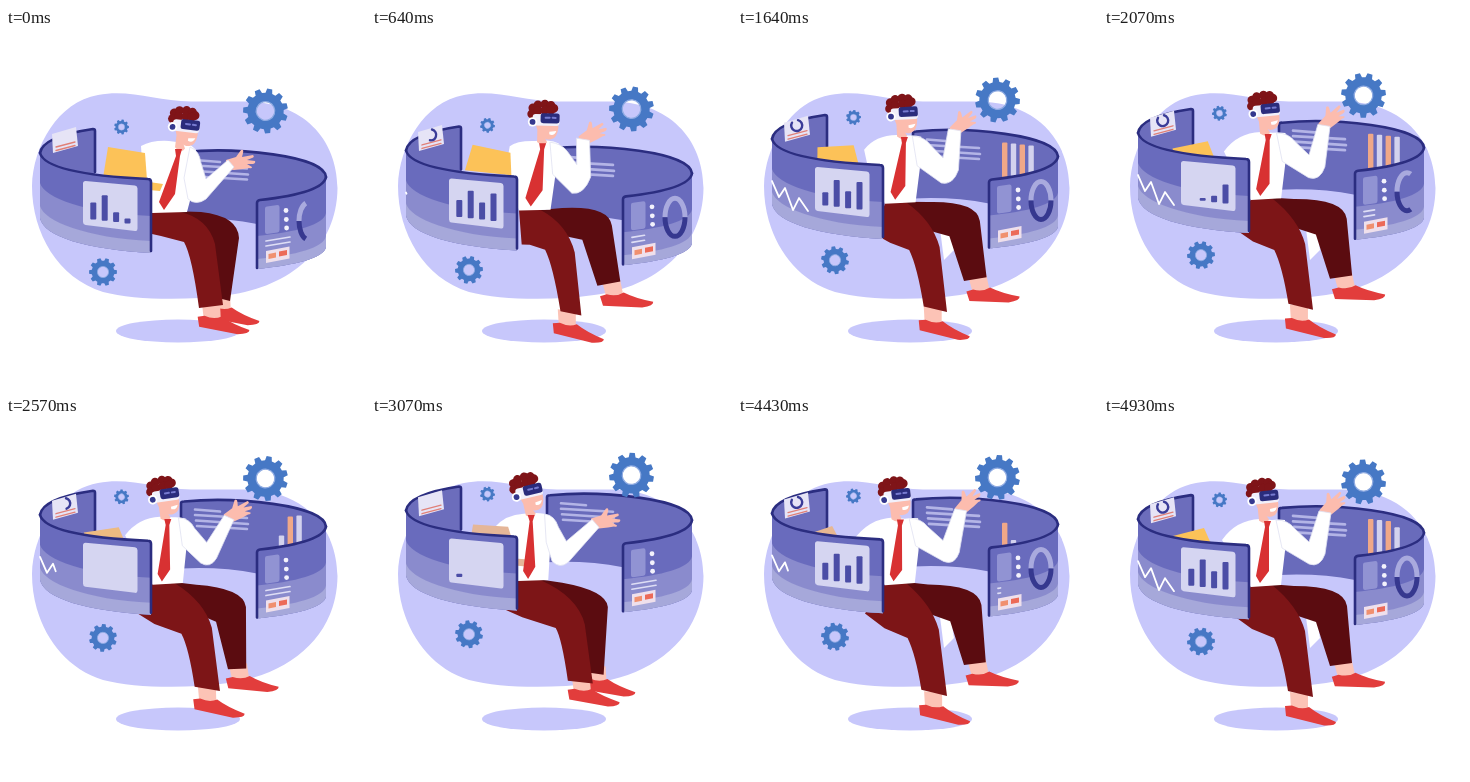
An HTML page for the animation above (5 s loop, 360x360 px).

```html
<!DOCTYPE html>
<html>
<head>
<meta charset="utf-8">
<style>
html, body { margin: 0; width: 100%; height: 100%; overflow: hidden; background: #fff; }
svg { display: block; width: 100vw; height: 100vh; }
.edge { fill: none; stroke: #2b2d80; stroke-width: 2.6; stroke-linejoin: round; stroke-linecap: round; }
.line { fill: none; stroke-linecap: round; stroke-linejoin: round; }
</style>
</head>
<body>
<svg viewBox="0 0 360 360">
  <path fill="#c7c7fb" d="M26 158C27 118 52 74 92 67C124 61 150 73 185 73.500H235C296 72 331 110 331.500 160C331 220 284 259 222 267C180 273 128 272 97 264C52 250 26 205 26 158Z"/>
  <ellipse cx="172" cy="303" rx="62" ry="11.500" fill="#c7c7fb"/>
  <g id="gearTiny"></g>
  <g id="gearLow"></g>

  <g id="backRight">
    <path fill="#696bbb" d="M175 77C225 72 318 80 320 102V165L251 160V149Q215 142 175 144Z"/>
    <path class="line" stroke="#b3b4e6" stroke-width="2.600" d="M189 85L214 87M189 90.500L241 93.500M190 96L242 99.500M191 101.500L241 104.500"/>
    <g id="cols"></g>
    <path class="edge" d="M175 143V79Q175 77 178 77C228 72 318 80 320 102"/>
  </g>
  <g id="gearBig"></g>

  <g id="backLeft">
    <path fill="#6c6dbc" d="M34 93C36 80 60 73 89 69V118L34 102Z"/>
    <path class="edge" d="M34 93C36 80 60 73 87 69Q89 69 89 71V112"/>
  </g>
  <g id="note">
    <path fill="#e6e4f6" d="M46 80L70 73L72 92L47 99Z"/>
    <path class="line" stroke="#e08078" stroke-width="1.300" d="M50 93L69 88M50 96.500L69 91.500"/>
    <path id="noteRing" class="line" stroke="#3a3c98" stroke-width="2.400" pathLength="100" d="M60 77.500A5.500 5.500 0 1 1 54 80"/>
  </g>

  <g id="man">
    <path id="gap" fill="#fff" d="M202 201L213 203L216 222L206 232Z"/>
    <g id="shoeB"></g>
    <path id="legB" fill="#5b0c10"/>
    <g id="shoeF"></g>
    <path id="legF" fill="#7d1517"/>
    <path id="torso" fill="#fff"/>
    <path id="tail"/>
    <path id="folder"/>
    <g id="hand"><path fill="#fcbcae" d="M-3 -4L7 -7L12 -14Q15 -15 14 -11L13 -7L24 -9Q26 -7 23 -6L18 -4L26 -3Q27 -1 24 0L18 0L23 3Q23 5 20 4L14 5L5 6L-3 5Z"/></g>
    <path id="arm" fill="#fff" stroke="#e0e1f2" stroke-width=".8"/>
    <g id="head">
      <path fill="#fcbcae" d="M-11 -28L13 -28L15 -15Q14 -4 8 -3Q3 -2 2 -4L4 0Q1 6 -6 0L-6 -12Z"/>
      <g id="hair" fill="#7f1418"></g>
      <path fill="#fff" d="M6 -10.500L13 -11.500Q11 -6 6 -8Z"/>
      <rect x="-11" y="-28" width="27" height="11.500" rx="3" fill="#f1f0fb"/>
      <rect x="-3" y="-29" width="19" height="10" rx="2.500" fill="#2a2c7c"/>
      <path class="line" stroke="#777bd0" stroke-width="2" d="M2 -24.500L6 -24.500M9 -24.500L12 -24.500"/>
      <circle cx="-11" cy="-20" r="4.700" fill="#fff"/>
      <circle cx="-11" cy="-20" r="2.900" fill="#34388e"/>
    </g>
    <path id="tie" fill="#d83132"/>
  </g>

  <g id="frontLeft">
    <path id="fl0" fill="#696bbd"/>
    <path id="fl1" fill="#8a8bcd"/>
    <path id="fl2" fill="#a6a8da"/>
    <path id="wave" class="line" stroke="#fff" stroke-width="1.800" pathLength="100" d="M34 135L41 151L47 142L55 164L61 152L70 165"/>
    <path fill="#d5d5f1" d="M79.500 121L129 125.500Q131.500 126 131.500 128.500V168.500Q131.500 171.500 129 171L79.500 165Q77 164.500 77 162V123.500Q77 121 79.500 121Z"/>
    <g id="bars" fill="#4b4da6"></g>
    <path class="edge" d="M34 93C38 108 80 116 142 119Q145 119 145 122V191"/>
  </g>

  <g id="frontRight">
    <path id="fr0" fill="#696bbd"/>
    <path id="fr1" fill="#8a8bcd"/>
    <path id="fr2" fill="#a6a8da"/>
    <path fill="#9193d3" d="M261 131.500L271.500 130Q273.500 130 273.500 132V155Q273.500 157 271.500 157.500L261 159Q259 159 259 157V133.500Q259 131.700 261 131.500Z"/>
    <g fill="#f3f2fc"><circle cx="280" cy="135.500" r="2.400"/><circle cx="280.300" cy="144.500" r="2.400"/><circle cx="280.600" cy="153" r="2.400"/></g>
    <path id="text1" class="line" stroke="#dedef5" stroke-width="1.700" pathLength="100" d="M260 166L284 162"/>
    <path id="text2" class="line" stroke="#dedef5" stroke-width="1.700" pathLength="100" d="M260 171L284 167"/>
    <path fill="#efe0ec" d="M260 176L283.500 171.500V183.500L260 188Z"/>
    <path fill="#f0906f" d="M262.500 179L270 177.500V182.500L262.500 184Z"/>
    <path fill="#ec6a58" d="M273 176.500L281 175V180L273 181.500Z"/>
    <path id="ringLight" fill="none" stroke="#a9aade" stroke-width="5" pathLength="100" d="M293 146A10 19 0 0 1 313 146"/>
    <path id="ringDark" fill="none" stroke="#36388f" stroke-width="5" pathLength="100" d="M293 146A10 19 0 0 0 313 146"/>
    <path class="edge" d="M320 102C318 114 290 121 254 125Q251 125.500 251 128V193"/>
  </g>
</svg>
<script>
const $ = id => document.getElementById(id);
const LOOP = 5000, FLOAT = 7143, BEAT = FLOAT / 2;
const set = (id, name, v) => $(id).setAttribute(name, v);
const move = (id, y) => set(id, 'transform', `translate(0 ${y.toFixed(2)})`);
const mix = (a, b, k) => a + (b - a) * k;
const ease = (t, from, len) => {
  const x = Math.min(1, Math.max(0, (t - from) / len));
  return x * x * (3 - 2 * x);
};
const pulse = (t, on, onLen, off, offLen) => ease(t, on, onLen) * (1 - ease(t, off, offLen));
const reveal = (id, k) => {
  set(id, 'stroke-dasharray', `${(k * 100).toFixed(2)} 300`);
  set(id, 'visibility', k > 0.01 ? 'visible' : 'hidden');
};

// Each shape: sitting high, sitting low, striding high, striding low.
const poses = {
  torso: ['M151 97Q133 98 122 111L128 135L146 164L176 163L178 125L178 99Q172 96 163 96Z',
          'M163 113Q146 112 135 118L137 150L146 185L181 184L190 150L190 122Q185 116 178 115Z',
          'M156 103Q132 104 118 124L130 145L147 171L177 169L181 135L181 104Q175 103 168 104Z',
          'M161 110Q141 110 132 120L132 145L147 179L178 178L183 140L185 112Q180 110 173 110Z'],
  arm: ['M172 97Q182 98 186 110L194 124L220 102L227 110L196 145Q188 152 180 144L174 125Z',
        'M184 119Q193 122 195 135L200 151L222 132L228 139L200 171Q190 178 182 171L178 150Z',
        'M172 104Q184 104 190 112L205 126L215 95L227 97L221 138Q216 152 205 148L178 132Z',
        'M176 111Q188 112 194 120L205 133L207 105L220 107L220 145Q214 162 202 160L180 142Z'],
  tie: ['M155 98L162 98L160 104L163 150L156 162L151 154L157 104Z',
        'M169 121L176 121L174 128L169 166L158 182L153 174L170 128Z',
        'M160 105L167 105L165 111L165 155L156 167L152 160L161 111Z',
        'M165 112L172 112L170 118L169 160L158 175L153 167L166 118Z'],
  legB: ['M165 162L190 166Q234 174 236 190L232 258L218 256L208 205L165 180Z',
         'M165 183L195 184Q232 188 233 210L224 273L212 270L204 215L165 205Z',
         'M165 168L190 170Q240 170 243 190L248 247L226 250L212 206L170 192Z',
         'M165 178L190 177Q238 175 241 195L249 251L226 255L211 210L170 200Z'],
  legF: ['M146 163L168 163Q206 180 213 208L221 267L196 264Q190 222 184 212L150 201L128 191Z',
         'M146 184L174 184Q202 190 209 216L217 277L193 280Q186 228 178 214L155 208L146 206Z',
         'M147 170L168 169Q194 190 201 215L209 281L184 275Q178 238 170 222L148 213L130 200Z',
         'M147 178L168 178Q195 195 202 222L209 286L187 281Q180 238 172 222L155 216L144 212Z'],
  folder: ['M101 108L136 110L140 122L99 120Z', 'M102 119L139 125L141 152L97 150Z',
           'M65 121L100 112L108 130L70 135Z', 'M90 118L127 121L130 142L86 140Z'],
  tail: ['M143 142L156 143L154 150L143 149Z', 'M143 154L157 156L154 163L143 162Z',
         'M132 142L144 143L143 150L132 149Z', 'M132 152L144 154L143 161L132 160Z']
};
// x, y, angle
const parts = {
  head: ['159 97 -14', '175 120 7', '161 104 -6', '168 111 -1'],
  hand: ['222 105 0', '223 136 0', '220 96 -32', '213 106 -24'],
  shoeF: ['209 260 -4', '205 276 -3', '195 278 0', '194.5 282 0'],
  shoeB: ['225 250 -4', '215 267 -3', '239 246 -12', '240 251 -12']
};
const nums = /-?\d+(\.\d+)?/g;
function blend(list, u, p) {
  const [a0, a2, b0, b2] = list.map(s => s.match(nums).map(Number));
  const kb = (Math.max(u, 0.45) - 0.633) / 0.852;
  let i = 0;
  return list[0].replace(nums, () => {
    const v = mix(mix(a0[i], a2[i], u / 2), mix(b0[i], b2[i], kb), p);
    i++;
    return v.toFixed(2);
  });
}

function gear(id, r, teeth, hole) {
  let d = '';
  const step = 2 * Math.PI / teeth, root = r * 0.81;
  for (let i = 0; i < teeth; i++) {
    [[-0.33, root], [-0.2, r], [0.2, r], [0.33, root]].forEach(([f, q], j) => {
      const a = (i + f) * step;
      d += `${i + j ? 'L' : 'M'}${(q * Math.cos(a)).toFixed(2)} ${(q * Math.sin(a)).toFixed(2)}`;
    });
  }
  d += `ZM${hole} 0A${hole} ${hole} 0 1 0 ${-hole} 0A${hole} ${hole} 0 1 0 ${hole} 0Z`;
  $(id).innerHTML = `<path fill="#4678c5" fill-rule="evenodd" d="${d}"/>` +
    `<circle r="${hole}" fill="none" stroke="#8fabe2" stroke-width="${r / 18}"/>`;
}
const spin = (id, x, y, a) => set(id, 'transform', `translate(${x} ${y.toFixed(2)}) rotate(${a.toFixed(2)})`);

const leftBand = (a, b) => `M34 ${93 + a}C38 ${108 + a} 80 ${116 + b} 145 ${119 + b}V193C80 189 38 177 34 158Z`;
const rightBand = a => `M320 ${102 + a}C318 ${114 + a} 290 ${121 + a} 251 ${125 + a}V194C290 190 318 183 320 172Z`;
[[0, 0], [30, 37], [53, 62]].forEach(([a, b], i) => set('fl' + i, 'd', leftBand(a, b)));
[0, 36, 59].forEach((a, i) => set('fr' + i, 'd', rightBand(a)));

gear('gearBig', 22.5, 11, 9.3);
gear('gearLow', 14, 10, 5.6);
gear('gearTiny', 7.5, 9, 3.2);

for (const id of ['shoeF', 'shoeB'])
  $(id).innerHTML = '<path fill="#fcc3b6" d="M-9 -2L9 0L9 15L-8 15Z"/>' +
    '<path fill="#e23d3c" d="M-14 12L-7 11.5Q2 16 10 13Q20 21 37 28Q37 32 25 31.5L-13 22Z"/>';
$('hair').innerHTML = [[-11, -34], [-6, -37], [1, -38], [7, -37], [10, -34], [-12, -28], [-6, -31], [1, -32], [7, -32]]
  .map(([x, y]) => `<circle cx="${x}" cy="${y}" r="4.4"/>`).join('');

const full = [17, 27.5, 17, 27.5];
$('bars').innerHTML = full.map((h, i) => `<rect id="bar${i}" x="${84.3 + i * 11.4}" width="6" rx="1"/>`).join('');
$('cols').innerHTML = full.map((h, i) =>
  `<rect id="col${i}" x="${264 + i * 8.8}" width="5.4" rx="1" fill="${i % 2 ? '#d3d2ee' : '#f0a888'}"/>`).join('');

function draw(t) {
  const ph = t % BEAT, q = (ph - 2900 + BEAT) % BEAT;
  const u = 1 + Math.cos(2 * Math.PI * t / FLOAT);
  const p = pulse(ph, 100, 620, 2250, 700);

  const turn = 360 * t / FLOAT;
  spin('gearBig', 259.5, 58 + 12.5 * u, turn + 19);
  spin('gearLow', 97, 217 + 13.5 * u, turn);
  spin('gearTiny', 115.5, 77 + 11 * u, -turn);
  for (const id of ['backLeft', 'frontLeft']) move(id, 16 * u);
  for (const id of ['backRight', 'frontRight']) move(id, 23.5 * u);
  move('note', 13 * u);

  for (const id in poses) set(id, 'd', blend(poses[id], u, p));
  for (const id in parts) {
    const [x, y, a] = blend(parts[id], u, p).split(' ');
    set(id, 'transform', `translate(${x} ${y}) rotate(${a})`);
  }
  const k = ease(u, 0.2, 0.4);
  const tone = `rgb(${[[229, 252], [182, 194], [152, 88]].map(([a, b]) => Math.round(mix(a, b, k))).join()})`;
  set('folder', 'fill', tone);
  set('tail', 'fill', tone);
  set('tail', 'opacity', 1 - ease(p, 0.2, 0.4));
  set('gap', 'visibility', p > 0.95 && u < 1.2 ? 'visible' : 'hidden');

  full.forEach((h, i) => {
    const bar = h * pulse(q, 170 * i, 600, 2130 + 130 * i, 600);
    set('bar' + i, 'y', 159.5 + i * 1.3 - bar);
    set('bar' + i, 'height', bar);
    const col = (40 - i) * pulse(ph, 545 + 145 * i, 500, 2100 + 200 * i, 500);
    set('col' + i, 'y', 128 - col);
    set('col' + i, 'height', col);
  });

  reveal('wave', pulse(ph, 600, 550, 2250, 600));
  reveal('noteRing', pulse(ph, 300, 600, 2250, 650));
  const ring = pulse(q, 200, 1050, 2300, 1000);
  reveal('ringLight', ring);
  reveal('ringDark', ring);
  const text = 1 - pulse(ph, 300, 700, 1750, 700);
  reveal('text1', text);
  reveal('text2', text);
}

function tick(now) {
  draw(now % LOOP);
  requestAnimationFrame(tick);
}
draw(0);
requestAnimationFrame(tick);
</script>
</body>
</html>
```
